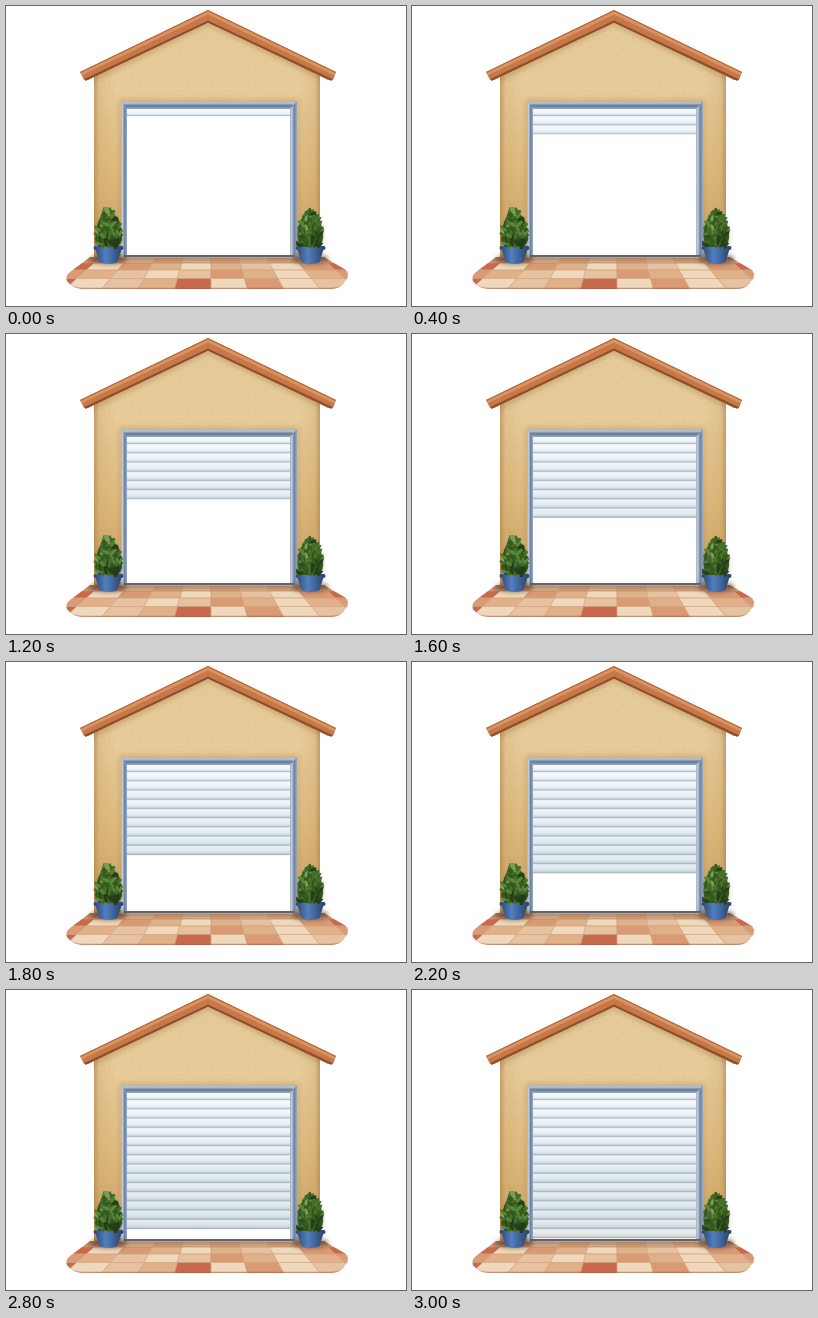
An HTML page that plays this animation: 400 by 300 pixels, repeating every 3200 ms.

```html
<!DOCTYPE html>
<html lang="en">
<head>
<meta charset="utf-8">
<title>Garage door</title>
<style>
html, body { margin: 0; width: 100%; height: 100%; overflow: hidden; background: #fff; }
svg { display: block; width: 400px; height: 300px; }
#gap { animation: close 3.2s steps(16, end) infinite; }
@keyframes close {
  from { transform: translateY(-138px); }
  to { transform: translateY(9.2px); }
}
</style>
</head>
<body>
<svg viewBox="0 0 400 300" xmlns="http://www.w3.org/2000/svg">
  <defs>
    <linearGradient id="wall" x2="0" y2="1">
      <stop offset="0" stop-color="#e6cb9a"/>
      <stop offset=".3" stop-color="#e8cd9b"/>
      <stop offset=".65" stop-color="#dfbb7e"/>
      <stop offset="1" stop-color="#cba162"/>
    </linearGradient>
    <linearGradient id="sides">
      <stop offset="0" stop-color="#a87c43" stop-opacity=".6"/>
      <stop offset=".025" stop-color="#b88c50" stop-opacity=".15"/>
      <stop offset=".1" stop-color="#b88c50" stop-opacity="0"/>
      <stop offset=".9" stop-color="#b88c50" stop-opacity="0"/>
      <stop offset=".975" stop-color="#b88c50" stop-opacity=".15"/>
      <stop offset="1" stop-color="#a87c43" stop-opacity=".6"/>
    </linearGradient>
    <linearGradient id="roof" gradientUnits="userSpaceOnUse" x1="0" y1="0" x2="5" y2="10" spreadMethod="pad">
      <stop offset="0" stop-color="#cf8555"/>
      <stop offset="1" stop-color="#b9683c"/>
    </linearGradient>
    <linearGradient id="panel" x2="0" y2="1">
      <stop offset="0" stop-color="#f3f8fc"/>
      <stop offset=".2" stop-color="#e6eef5"/>
      <stop offset=".6" stop-color="#d8e4eb"/>
      <stop offset=".88" stop-color="#d2dfe4"/>
      <stop offset="1" stop-color="#e3e3de"/>
    </linearGradient>
    <linearGradient id="slat" x2="0" y2="1">
      <stop offset="0" stop-color="#fff" stop-opacity=".5"/>
      <stop offset=".5" stop-color="#fff" stop-opacity=".15"/>
      <stop offset=".72" stop-color="#8fa3b2" stop-opacity=".1"/>
      <stop offset=".9" stop-color="#8799a8" stop-opacity=".6"/>
      <stop offset="1" stop-color="#8fa3b2" stop-opacity=".25"/>
    </linearGradient>
    <linearGradient id="post">
      <stop offset="0" stop-color="#a5b2c2"/>
      <stop offset=".25" stop-color="#c0ccda"/>
      <stop offset=".6" stop-color="#6d80a0"/>
      <stop offset="1" stop-color="#9aabc4"/>
    </linearGradient>
    <linearGradient id="beam" x2="0" y2="1">
      <stop offset="0" stop-color="#a3b0c0"/>
      <stop offset=".25" stop-color="#bac7d5"/>
      <stop offset=".6" stop-color="#64779a"/>
      <stop offset="1" stop-color="#9aabc4"/>
    </linearGradient>
    <linearGradient id="pot">
      <stop offset="0" stop-color="#2a477c"/>
      <stop offset=".4" stop-color="#537fbd"/>
      <stop offset="1" stop-color="#27416f"/>
    </linearGradient>
    <filter id="grain" x="0" y="0" width="1" height="1">
      <feTurbulence type="fractalNoise" baseFrequency=".45" numOctaves="2" seed="4"/>
      <feColorMatrix values="0 0 0 0 .5  0 0 0 0 .34  0 0 0 0 .12  .9 0 0 0 -.36"/>
      <feComposite in2="SourceGraphic" operator="in"/>
    </filter>
    <filter id="soft" x="-.4" y="-.4" width="1.8" height="1.8"><feGaussianBlur stdDeviation="2.500"/></filter>
    <filter id="blur" x="-.1" y="-.1" width="1.2" height="1.2"><feGaussianBlur stdDeviation=".6"/></filter>
    <clipPath id="house"><path id="front" d="M88 252V66L202 10L314 65V252Z"/></clipPath>
    <clipPath id="hole"><path d="M121 103H284V250H121Z"/></clipPath>
    <clipPath id="floor"><path d="M84 251H318L340 264Q344 269 340 274Q335 283 325 283H76Q66 282 61 275Q59 270 64 266Z"/></clipPath>
  </defs>

  <g clip-path="url(#floor)">
    <g id="tiles" filter="url(#blur)"></g>
    <path d="M60 274Q64 282.400 76 282.400H325Q337 282.400 342 273" fill="none" stroke="#a9573f" stroke-width="1.500" opacity=".55"/>
    <path d="M80 249H322V255H80Z" fill="#7a4c2f" opacity=".55" filter="url(#soft)"/>
  </g>

  <g clip-path="url(#house)">
    <use href="#front" fill="url(#wall)"/>
    <use href="#front" fill="url(#sides)"/>
    <path d="M78 77L202 16L326 76" fill="none" stroke="#9a6a34" stroke-width="5" opacity=".4" filter="url(#soft)"/>
    <path d="M115 252V95H291V252" fill="none" stroke="#96703c" stroke-width="3" opacity=".35" filter="url(#soft)"/>
    <use href="#front" filter="url(#grain)" opacity=".35"/>
  </g>

  <path d="M74 66L202 4L330 66L327 74H322L202 16L82 74H78Z" fill="#c67848"/>
  <path d="M75.500 68L202 7L328.500 68" fill="none" stroke="#d99463" stroke-width="2.500"/>
  <path d="M74 66.500L202 4.500L330 66.500" fill="none" stroke="#b5673a" stroke-width="1"/>
  <path d="M79 74L202 15.500L326 74" fill="none" stroke="#8f4d2a" stroke-width="2"/>

  <g clip-path="url(#hole)">
    <path d="M121 103H284V250H121Z" fill="url(#panel)"/>
    <g id="slats"></g>
    <path id="gap" d="M121 248.500H284V400H121Z" fill="#fff"/>
  </g>
  <path d="M115 95L121 103V252H115Z" fill="url(#post)"/>
  <path d="M291 95L284 103V252H291Z" fill="url(#post)"/>
  <path d="M115 95H291L284 103H121Z" fill="url(#beam)"/>
  <path d="M118 250H288" stroke="#5f6470" stroke-width="2"/>

  <g id="plants"></g>
</svg>
<script>
const NS = 'http://www.w3.org/2000/svg';
const add = (parent, tag, attrs) => {
  const node = document.createElementNS(NS, tag);
  for (const key in attrs) node.setAttribute(key, attrs[key]);
  return parent.appendChild(node);
};
const byId = id => document.getElementById(id);
let seed = 11;
const rand = () => (seed = seed * 16807 % 2147483647) / 2147483647;

// Slats, counted up from the sill
const pitch = 9.2;
for (let i = 1; i <= 16; i++) {
  add(byId('slats'), 'rect', { x: 121, y: 248.5 - i * pitch, width: 163, height: pitch, fill: 'url(#slat)' });
}

// Paving in perspective
const colors = { r: '#c8694d', o: '#d99a74', t: '#e0b088', c: '#efd8bb', p: '#e6c3a0' };
const rows = ['otptptptpo', 'rcotctpcor', 'otpcpotcto', 'rcptrcocpr'];
const ys = [251, 257, 264, 272.5, 284];
const edge = (col, y) => 205 + (col - 5) * (27.5 + (y - 251) * 0.28);
rows.forEach((row, r) => [...row].forEach((key, c) => {
  const [a, b] = [ys[r], ys[r + 1]];
  add(byId('tiles'), 'path', {
    d: `M${edge(c, a)} ${a}H${edge(c + 1, a)}L${edge(c + 1, b)} ${b}H${edge(c, b)}Z`,
    fill: colors[key], stroke: '#cfa07c', 'stroke-width': 0.6
  });
}));

// Potted shrubs
const greens = ['#233f18', '#345a20', '#456f2b', '#5c8638', '#7c9f50'];
const plant = x => {
  const g = add(byId('plants'), 'g', {});
  add(g, 'ellipse', { cx: x, cy: 253, rx: 18, ry: 5, fill: '#4a2f20', opacity: 0.6, filter: 'url(#soft)' });
  add(g, 'ellipse', { cx: x, cy: 230, rx: 12, ry: 20, fill: '#5d4620', opacity: 0.45, filter: 'url(#soft)' });
  add(g, 'path', { d: `M${x - 14} 240H${x + 14}L${x + 9} 256Q${x} 260 ${x - 9} 256Z`, fill: 'url(#pot)' });
  add(g, 'rect', { x: x - 15, y: 240, width: 30, height: 4, rx: 2, fill: 'url(#pot)' });
  const shrub = add(g, 'g', { filter: 'url(#blur)' });
  add(shrub, 'path', {
    d: `M${x - 9} 241Q${x - 17} 230 ${x - 9} 213Q${x - 4} 201 ${x} 204Q${x + 9} 208 ${x + 11} 220Q${x + 15} 233 ${x + 9} 241Z`,
    fill: '#34541f'
  });
  for (let i = 0; i < 120; i++) {
    const v = rand(), u = rand() * 2 - 1;
    const half = 3 + 9.5 * Math.sin(Math.min(1, v * 1.5) * Math.PI / 2);
    const px = x + u * half, py = 204 + v * 36;
    const tone = Math.floor(rand() * 3.6 + (u < 0.3 ? 1 : 0) - (v > 0.75 ? 1.5 : 0));
    add(shrub, 'ellipse', {
      cx: px, cy: py, rx: 3.3, ry: 1.5, fill: greens[Math.min(4, Math.max(0, tone))],
      transform: `rotate(${u * 45 + (rand() - 0.5) * 80 - 90} ${px} ${py})`
    });
  }
};
plant(102.5);
plant(304.5);
</script>
</body>
</html>
```
